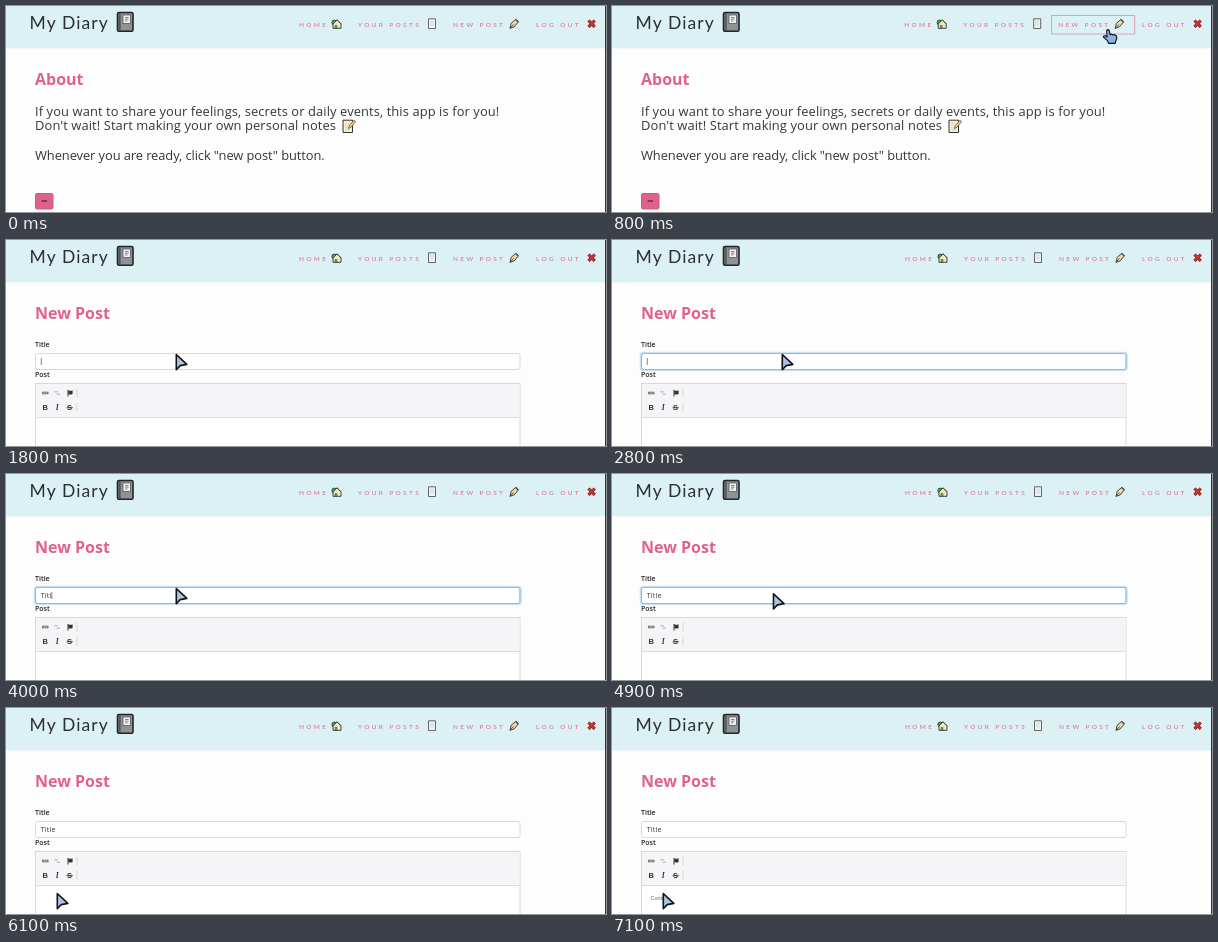
Recreate the animation shown at these times as an HTML page. Size 600x206 px, loop 7200 ms.

```html
<!DOCTYPE html>
<html lang="en">
<head>
<meta charset="utf-8">
<title>My Diary</title>
<style>
  html, body { margin: 0; width: 100%; height: 100%; overflow: hidden; background: #fefdfe; }
  svg { display: block; width: 100vw; height: 100vh; }
  text { font-family: "Open Sans", "Noto Sans", sans-serif; fill: #33373c; white-space: pre; }
  .brand { font: 400 17.5px Lato, sans-serif; letter-spacing: 1.1px; fill: #2b2f31; }
  .nav { font: 6.5px Lato, sans-serif; letter-spacing: 2.35px; fill: #e2668c; }
  .head { font-size: 16px; font-weight: 700; fill: #e0628a; }
  .body { font-size: 12.9px; letter-spacing: .1px; }
  .tight { letter-spacing: -.08px; }
  .label { font-size: 7px; font-weight: 600; fill: #222; }
  .input { font-size: 7px; letter-spacing: .2px; }
  .tool { font: 700 7.5px "Liberation Sans", Arial, sans-serif; fill: #333; text-anchor: middle; }
  .content { font: 5.5px "Liberation Sans", Arial, sans-serif; fill: #666; }
</style>
</head>
<body>
<svg viewBox="0 0 600 206" preserveAspectRatio="none">
  <rect width="600" height="206" fill="#fefdfe"/>
  <rect width="600" height="42.4" fill="#dbf1f4"/>

  <text class="brand" x="23.5" y="22.5">My Diary</text>
  <g>
    <rect x="111.5" y="6.5" width="15.5" height="18.8" rx="1.5" fill="#8e9295" stroke="#222527" stroke-width="1.6"/>
    <path d="M113.7 7.5v17" stroke="#33373a" stroke-width="2" stroke-dasharray="1.2 .8"/>
    <rect x="117" y="9" width="7.5" height="8.5" fill="#f1f2f2" stroke="#55595c" stroke-width=".8"/>
    <path d="M119 11.5h3.6M119 13.2h3.6M119 14.9h2.4" stroke="#55595c" stroke-width=".7"/>
  </g>

  <g id="links">
    <text class="nav" x="293" y="20.5">HOME</text>
    <g stroke="#2b352d" stroke-width=".9">
      <circle cx="328.3" cy="16.5" r="2.4" fill="#58b05e"/>
      <path d="M327 18l4-4 4 4v4.3h-8z" fill="#efe9c2"/>
      <path d="M326.6 18l4.4-4.4 4.4 4.4" fill="none" stroke="#287044"/>
      <path d="M329 19.5h2v2.6h-2z" fill="#7cb56c" stroke-width=".5"/>
    </g>
    <text class="nav" x="352" y="20.5">YOUR POSTS</text>
    <path d="M422.5 12.8h7v9.7h-7z" fill="#eef2f3" stroke="#555" stroke-width=".9"/>
    <path d="M424 15.2h4M424 17h4M424 18.8h4" stroke="#bcc4c8" stroke-width=".5"/>
    <text class="nav" x="447" y="20.5">NEW POST</text>
    <path d="M504 22.3l1.2-5 4.6-4 2.6 2.6-4.2 5z" fill="#eed9a4" stroke="#333" stroke-width=".9"/>
    <path d="M504 22.3l3.6-3.8" stroke="#333" stroke-width=".8"/>
    <path d="M509 13.8l2.6 2.8 1.2-1-2.8-2.9z" fill="#555"/>
    <rect id="hover" x="440.3" y="9.5" width="83.2" height="18.5" fill="none" stroke="#dfa0bb"/>
  </g>
  <text class="nav" x="530" y="20.5">LOG OUT</text>
  <path d="M582.5 14.5l6.2 6.4M588.7 14.5l-6.2 6.4" stroke="#5c1e1e" stroke-width="3"/>
  <path d="M582.5 14.5l6.2 6.4M588.7 14.5l-6.2 6.4" stroke="#cf332f" stroke-width="1.9"/>

  <g id="about">
    <text class="head" x="29" y="79">About</text>
    <text class="body" x="29" y="109.5">If you want to share your feelings, secrets or daily events, this app is for you!</text>
    <text class="body" x="29" y="124.3">Don't wait! Start making your own personal notes</text>
    <text class="body tight" x="29" y="153.8">Whenever you are ready, click "new post" button.</text>
    <path d="M337 114.2h9.5v12.3h-9.5z" fill="#f6efda" stroke="#333"/>
    <path d="M339 117.2h4M339 119.4h3M339 121.6h2.5M339 123.8h5" stroke="#c9c1ab" stroke-width=".6"/>
    <path d="M342.3 122.6l1-3 4.6-5.4 1.8 1.5-4.6 5.4z" fill="#efcb82" stroke="#54462f" stroke-width=".7"/>
    <rect x="29.5" y="187.5" width="17.5" height="15.5" rx="1.5" fill="#e0628a" stroke="#cd5a7d"/>
    <path d="M35.5 195h5.5" stroke="#442530" stroke-width="1.2"/>
  </g>

  <g id="post">
    <text class="head" x="29" y="79">New Post</text>
    <text class="label" x="29" y="107">Title</text>
    <rect x="29.5" y="113.5" width="484.5" height="16" rx="2" fill="#fff" stroke="#d8d7da"/>
    <g id="ring" fill="none">
      <rect x="28.9" y="112.9" width="485.7" height="17.2" rx="2.5" stroke="#c7e2f8" stroke-width="2.4"/>
      <rect x="29.5" y="113.5" width="484.5" height="16" rx="2" stroke="#83bdeb"/>
    </g>
    <text class="label" x="29" y="137">Post</text>
    <rect x="29.5" y="143.5" width="484.5" height="70" fill="#fff" stroke="#d8d7da"/>
    <rect x="30" y="144" width="483.5" height="33" fill="#f5f4f6"/>
    <path d="M30 177.5h484" stroke="#dddce0"/>
    <g id="tools">
      <path d="M36 153h6.5" stroke="#777" stroke-width="2.6"/>
      <path d="M37.2 153h4" stroke="#ccc" stroke-width=".7"/>
      <path d="M48.3 151.8h3.5M50.5 154.2h3.5" stroke="#c6c6c8" stroke-width="1.4"/>
      <path d="M62 150v6.5" stroke="#333" stroke-width="1"/>
      <path d="M62.3 150.2q2 1 4.3 0v3.8q-2.3 1-4.3 0z" fill="#333"/>
      <path d="M71 149v8M71 163.5v8" stroke="#c4c4c6" stroke-width=".8" stroke-dasharray="1.5 .7"/>
      <text class="tool" x="39.3" y="170.4">B</text>
      <text class="tool" x="51.2" y="170.4" style="font-family:'Liberation Serif',serif;font-style:italic">I</text>
      <text class="tool" x="63.6" y="170.4">S</text>
      <path d="M60.5 167.7h6.4" stroke="#333" stroke-width=".8"/>
    </g>
    <text id="title" class="input" x="34.8" y="123.5"></text>
    <rect id="titleCaret" y="118" width=".8" height="7" fill="#666"/>
    <text id="content" class="content" x="38.6" y="192.2"></text>
    <rect id="contentCaret" y="187" width=".8" height="7" fill="#777"/>
  </g>

  <path d="M599.5 0v206" stroke="#303335"/>

  <g id="cursor" stroke="#111" stroke-linejoin="round">
    <path id="arrow" d="M.3.5v15.2l3.9-4.1 6.6-1.2z" fill="#a9c5e6" stroke-width="1.6"/>
    <path id="hand" d="M-1.3 1.2q1.4-1.2 2.4.2l1.1 4.4 1-.8 1.6.9 1.4-.4 1.2 1 1 .2.4 2.5-1 2.8-.6 2.4H.7L-.6 11.6l-4-3.6q.1-1.6 1.8-1.2l1.8 1.2z" fill="#8fb2df" stroke-width="1.1"/>
  </g>
</svg>
<script>
const LOOP = 7200, STEP = 100;
const el = id => document.getElementById(id);
const show = (id, on) => el(id).setAttribute("visibility", on ? "visible" : "hidden");
const within = (t, a, b) => t >= a && t < b;
const ramp = (t, a, b) => Math.min(1, Math.max(0, (t - a) / (b - a)));
const ease = p => p * p * (3 - 2 * p);

// time, x, y, scale
const path = [
  [100, 601, 206, .55], [700, 496, 23, 1], [900, 496, 23, 1], [1300, 296.3, 96.5, .55],
  [1700, 170, 114, 1], [4800, 170, 114, 1], [5400, 51, 185, 1]
];
const titleKeys = [3100, 3500, 3700, 3900, 4200];
const contentKeys = [6200, 6400, 6700, 6900, 7000, 7100];

function pointer(t) {
  const i = path.findIndex(k => k[0] > t);
  if (i < 0) return path[path.length - 1].slice(1);
  const a = path[Math.max(0, i - 1)], b = path[i];
  const p = ease(ramp(t, a[0], b[0]));
  return [1, 2, 3].map(n => a[n] + (b[n] - a[n]) * p);
}

function type(id, word, keys, t, caretOn) {
  const node = el(id);
  node.textContent = word.slice(0, keys.filter(k => t >= k).length);
  el(id + "Caret").setAttribute("x", +node.getAttribute("x") + node.getComputedTextLength());
  show(id + "Caret", caretOn);
}

function draw(now) {
  const t = Math.floor(now % LOOP / STEP) * STEP;
  const onPost = t >= 1500, hover = within(t, 600, 1500);
  show("about", !onPost);
  show("post", onPost);
  show("hover", hover);
  show("tools", t >= 1700);
  el("links").setAttribute("transform", `translate(${hover ? -.8 : 0})`);
  el("ring").setAttribute("opacity", ramp(t, 1800, 2100) * (1 - ramp(t, 5400, 5600)));

  type("title", "Title", titleKeys, t, within(t, 1700, 2300) || within(t, 2800, 4700));
  type("content", "Conten", contentKeys, t, within(t, 5400, 6000));

  const [x, y, s] = pointer(t), onLink = within(t, 700, 1000);
  el("cursor").setAttribute("transform", `translate(${x} ${y}) scale(${s})`);
  show("arrow", t >= 100 && !onLink);
  show("hand", onLink);
  el("arrow").setAttribute("fill", s < .7 ? "#fff" : "#a9c5e6");
}

const start = performance.now();
function tick() {
  draw(performance.now() - start);
  requestAnimationFrame(tick);
}
tick();
</script>
</body>
</html>
```
